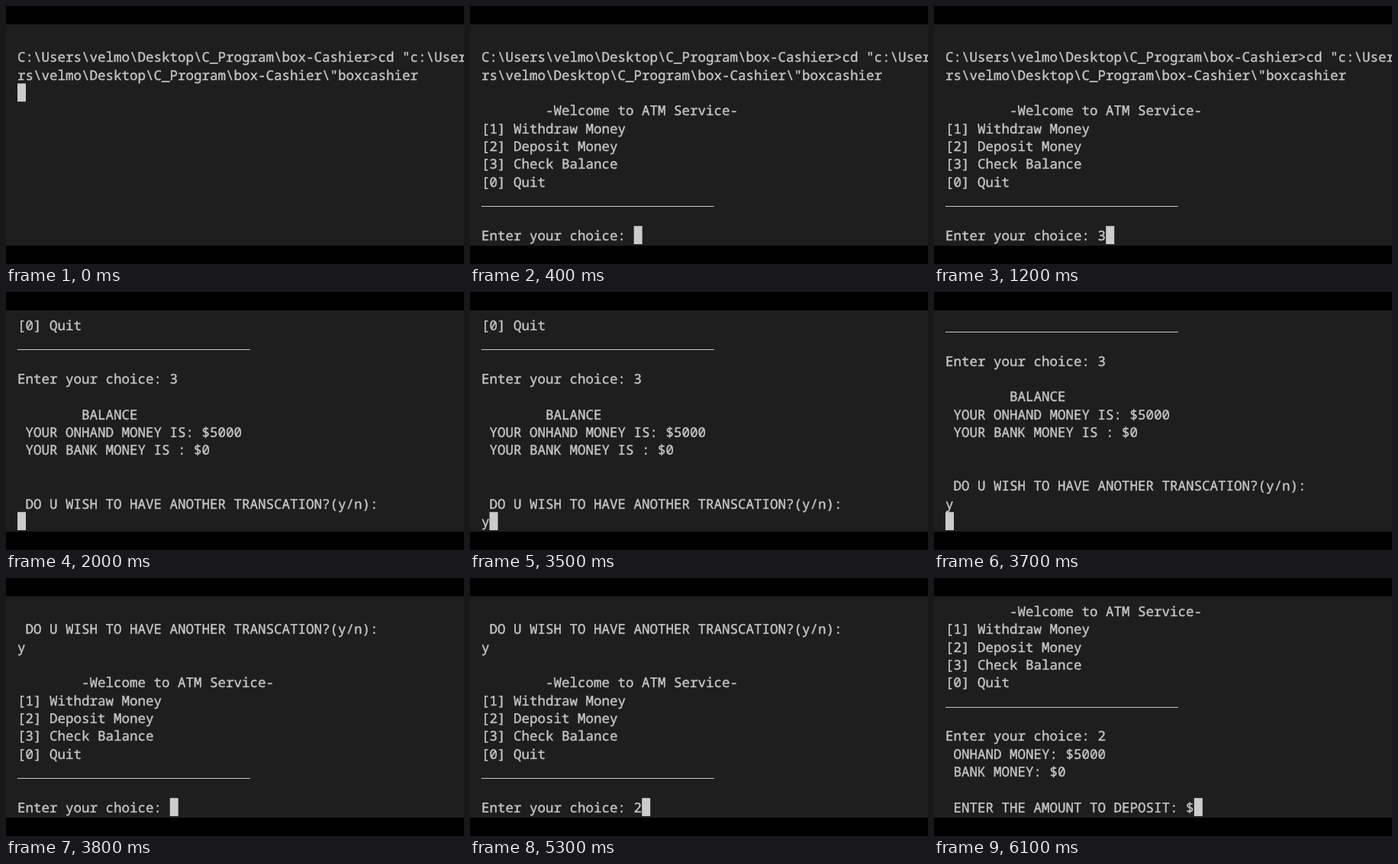
Write an HTML page with a canvas that moves like this. It is 600 px wide and 338 px high and loops after 8000 ms.

```html
<!DOCTYPE html>
<html lang="en">
<head>
<meta charset="utf-8">
<title>Terminal session</title>
<style>
  html, body { margin: 0; width: 100%; height: 100%; overflow: hidden; background: #000; }
  canvas { display: block; }
</style>
</head>
<body>
<canvas id="screen" width="600" height="338"></canvas>
<script>
const ctx = document.getElementById('screen').getContext('2d');

const LOOP = 8000;
const ROWS = 12;
const LEFT = 15, TOP = 32, CELL_W = 10.51, CELL_H = 23.35, BASELINE = 18;
const RULE = '_'.repeat(29);

const menu = choice => [
  '        -Welcome to ATM Service-',
  '[1] Withdraw Money',
  '[2] Deposit Money',
  '[3] Check Balance',
  '[0] Quit',
  RULE,
  '',
  'Enter your choice: ' + choice
];

const log = [
  '',
  'C:\\Users\\velmo\\Desktop\\C_Program\\box-Cashier>cd "c:\\User',
  'rs\\velmo\\Desktop\\C_Program\\box-Cashier\\"boxcashier',
  '',
  ...menu(3),
  '',
  '        BALANCE',
  ' YOUR ONHAND MONEY IS: $5000',
  ' YOUR BANK MONEY IS : $0',
  '',
  '',
  ' DO U WISH TO HAVE ANOTHER TRANSCATION?(y/n):',
  'y',
  '',
  ...menu(2),
  ' ONHAND MONEY: $5000',
  ' BANK MONEY: $0',
  '',
  ' ENTER THE AMOUNT TO DEPOSIT: $'
];

// Cursor position over time: [start ms, log line, column]
const steps = [
  [0, 3, 0],
  [400, 11, 19],
  [1200, 11, 20],
  [2000, 19, 0],
  [3500, 19, 1],
  [3700, 20, 0],
  [3800, 28, 19],
  [5300, 28, 20],
  [6100, 32, 31]
];

function drawLine(text, top) {
  const y = top + BASELINE;
  if (text === RULE) {
    ctx.fillRect(LEFT, Math.round(y + 2), RULE.length * CELL_W, 1);
  } else {
    ctx.fillText(text, LEFT, y);
    ctx.strokeText(text, LEFT, y);
  }
}

function draw(time) {
  const [, line, column] = steps.findLast(([start]) => start <= time);
  const first = Math.max(0, line - ROWS + 1);
  const rowTop = i => TOP + (i - first) * CELL_H;

  ctx.fillStyle = '#000';
  ctx.fillRect(0, 0, 600, 338);
  ctx.fillStyle = '#1e1e1e';
  ctx.fillRect(0, 24, 600, 290);

  // A thin outline gives the text a slightly heavier weight.
  ctx.font = `${CELL_W / 0.6}px "Noto Sans Mono", monospace`;
  ctx.textRendering = 'geometricPrecision';
  ctx.fillStyle = ctx.strokeStyle = '#c6c6c6';
  ctx.lineWidth = 0.4;
  ctx.lineJoin = 'round';
  for (let i = first; i <= line; i++) {
    drawLine(i < line ? log[i] : log[i].slice(0, column), rowTop(i));
  }
  ctx.fillStyle = '#ccc';
  ctx.fillRect(LEFT + column * CELL_W, rowTop(line) - 0.6, 11, 23.8);
}

const startTime = performance.now();
function tick() {
  draw((performance.now() - startTime) % LOOP);
  requestAnimationFrame(tick);
}
tick();
</script>
</body>
</html>
```
